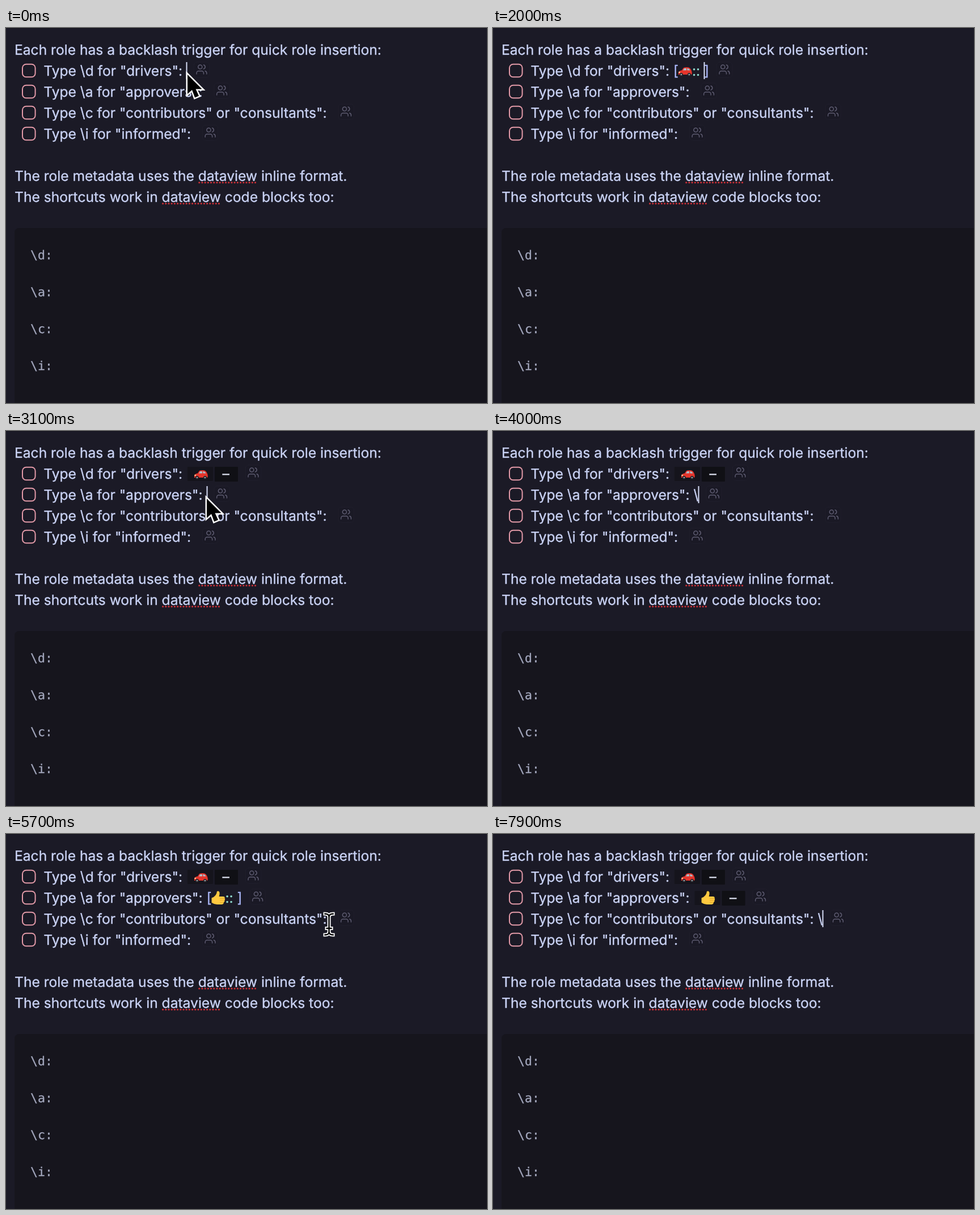
These frames come from a looping animation (848x660 px, 8000 ms). An HTML page with a canvas:

```html
<!DOCTYPE html>
<html lang="en">
<meta charset="utf-8">
<title>Role shortcuts</title>
<style>
  html, body { margin: 0; width: 100%; height: 100%; overflow: hidden; background: #1b1a26 }
  canvas { display: block }
</style>
<canvas id="stage" width="848" height="660"></canvas>
<script>
const c = document.getElementById('stage').getContext('2d');
const SANS = '24.6px Inter, sans-serif';
const MONO = '21.5px "DejaVu Sans Mono", monospace';
const TEXT = '#cad3f5', LAVENDER = '#a9b6f6', TEAL = '#94e2d5';
const LOOP = 8000;

const peoplePaths = [
  'M16 21v-2a4 4 0 0 0-4-4H6a4 4 0 0 0-4 4v2', 'M13 7a4 4 0 1 1-8 0a4 4 0 1 1 8 0',
  'M22 21v-2a4 4 0 0 0-3-3.87M16 3.13a4 4 0 0 1 0 7.75'
].map(d => new Path2D(d));
const arrow = new Path2D('M0 0V34L8 27L13 40.5L20 37.5L14.5 25.5H25.5Z');
const beam = new Path2D('M-7-18.5Q0-18.5 0-13Q0-18.5 7-18.5M0-13V13M-7 18.5Q0 18.5 0 13Q0 18.5 7 18.5M-4 7H4');

const emoji = {
  car: [
    ['#e5352c', 'M1 16V12Q2 9 7 8.5L10 4Q12 3 16 3Q21 3 23 7Q25 10 25 14L24 16Z'],
    ['#a9c3cf', 'M9 8.5L11.5 5H15V8.5ZM16.5 8.5V5Q20 5 21.5 8.5Z'],
    ['#f4d9a0', 'M1.5 11H4V13H1.5Z'],
    ['#26262c', 'M9 16a3 3 0 1 1-6 0a3 3 0 1 1 6 0M23 16a3 3 0 1 1-6 0a3 3 0 1 1 6 0'],
    ['#a4a6ad', 'M7.3 16a1.3 1.3 0 1 1-2.6 0a1.3 1.3 0 1 1 2.6 0M21.3 16a1.3 1.3 0 1 1-2.6 0a1.3 1.3 0 1 1 2.6 0']
  ],
  thumb: [
    ['#ffc940', 'M1 12Q5 11 8 7Q10 4 10 1Q14-1 14.5 4Q14.5 7 13.5 9.5H21Q24 10 23 12.5Q24.5 14 23 16Q23.5 18.5 21.5 19.5Q21.5 22.5 18.5 23H10Q5 23 1 20Z'],
    ['#dd9a26', 'M15 12.4H23V13.2H15ZM15 15.8H23V16.6H15ZM15 19.2H21.5V20H15Z']
  ]
};
for (const parts of Object.values(emoji))
  for (const p of parts) p[1] = new Path2D(p[1]);

const rows = [
  { label: 'Type \\d for "drivers": ', icon: 'car', slash: 1800, insert: 2000, close: 3000 },
  { label: 'Type \\a for "approvers": ', icon: 'thumb', slash: 4000, insert: 4200, close: 5800 },
  { label: 'Type \\c for "contributors" or "consultants": ', slash: 7900 },
  { label: 'Type \\i for "informed": ' }
];

// Caret resets: start time and row; it blinks 500 ms on, 500 ms off.
const carets = [[-300, 0], [700, 0], [1800, 0], [2000, 0], [3000, 1], [4000, 1], [4200, 1], [5800, 2], [7900, 2]];

// Pointer path: time, x, y.
const path = [
  [0, 320, 82], [2300, 320, 82], [2600, 350, 124], [3000, 354, 119], [4600, 354, 119],
  [4900, 599, 140], [5200, 611, 150], [5450, 569.5, 159], [7000, 569.5, 159], [7300, 617, 183], [LOOP, 617, 183]
];
const hidden = [[1700, 2300], [3800, 4600], [7800, LOOP]];

function text(s, x, y, color = TEXT, font = SANS) {
  c.font = font;
  c.textRendering = 'geometricPrecision';   // fractional advances
  c.fillStyle = c.strokeStyle = color;
  c.lineWidth = .35;
  c.fillText(s, x, y);
  c.strokeText(s, x, y);
  return x + c.measureText(s).width;
}

function box(x, y, w, h, r, fill, stroke, line = 1) {
  c.beginPath();
  c.roundRect(x, y, w, h, r);
  if (fill) { c.fillStyle = fill; c.fill(); }
  if (stroke) { c.strokeStyle = stroke; c.lineWidth = line; c.stroke(); }
}

function at(x, y, scale, draw) {
  c.save();
  c.translate(x, y);
  c.scale(scale, scale);
  draw();
  c.restore();
}

function drawEmoji(name, x, y) {
  at(x, y - (name === 'car' ? 17.5 : 20.5), name === 'car' ? 1 : 1.04, () => {
    for (const [color, p] of emoji[name]) { c.fillStyle = color; c.fill(p); }
  });
}

function pointerAt(t) {
  if (hidden.some(([from, to]) => t >= from && t < to)) return null;
  const i = path.findIndex(p => p[0] > t);
  const [t0, x0, y0] = path[i - 1], [t1, x1, y1] = path[i];
  const k = (t - t0) / (t1 - t0), e = k * k * (3 - 2 * k);
  return { x: x0 + (x1 - x0) * e, y: y0 + (y1 - y0) * e, beam: t > 5350 && t < 7100 };
}

function peopleButton(x, y, pointer) {
  const over = pointer && !pointer.beam && Math.abs(pointer.x - x) < 14 && Math.abs(pointer.y - y) < 14;
  box(x - 13.5, y - 13, 27, 27, 5, over ? '#37374d' : '#1a1925', over ? null : '#201f2c');
  at(x - 10.7, y - 10.7, .89, () => {
    c.strokeStyle = over ? '#62617a' : '#5d5b70';
    c.lineWidth = 1.7;
    for (const p of peoplePaths) c.stroke(p);
  });
}

function drawRow(row, i, t, pointer) {
  const mid = 75 + 37 * i, base = mid + 8.5;
  box(29, mid - 11.3, 22.6, 22.6, 6.5, null, '#e39aa8', 2);
  let x = text(row.label, 66.3, base), caret = x;
  if (t >= row.close) {
    box(x + 2, mid - 12, 45, 25, 1, '#15141c');
    drawEmoji(row.icon, x + 13, base);
    box(x + 50, mid - 12, 41, 26, 1, '#101015');
    text('–', x + 63.5, base, '#dfe3f2');
    x += 91;
  } else if (t >= row.insert) {
    const inner = text('[', x, base, LAVENDER);
    drawEmoji(row.icon, inner - 1, base);
    caret = text(':: ', inner + 24, base, TEAL);
    x = text(']', caret, base, LAVENDER);
  } else if (t >= row.slash) {
    caret = x = text('\\', x, base);
  }
  const [since, target] = carets.findLast(k => k[0] <= t);
  if (target === i && (t - since) % 1000 < 500) {
    c.fillStyle = '#d6dcf5';
    c.fillRect(Math.round(caret) - .5, mid - 15, 2, 30);
  }
  peopleButton(x + 27, mid - 2, pointer);
}

function misspelt(before, word, after, y) {
  const from = text(before, 15, y), to = text(word, from, y);
  text(after, to, y);
  c.fillStyle = '#cf3038';
  for (let x = from + 2; x < to; x += 5.2) {
    c.beginPath();
    c.arc(x, y + 3.5, 1.6, 0, 7);
    c.fill();
  }
}

function drawPointer(p) {
  at(p.x, p.y, 1, () => {
    c.lineJoin = 'miter';
    c.strokeStyle = '#fff';
    if (p.beam) {
      c.lineCap = 'square';
      c.lineWidth = 6;
      c.stroke(beam);
      c.strokeStyle = '#000';
      c.lineWidth = 2.4;
      c.stroke(beam);
    } else {
      c.lineWidth = 5;
      c.stroke(arrow);
      c.fillStyle = '#000';
      c.fill(arrow);
    }
  });
}

function draw(now) {
  const t = now % LOOP, pointer = pointerAt(t);
  c.fillStyle = '#1b1a26';
  c.fillRect(0, 0, 848, 660);
  c.fillStyle = '#14131c';
  c.fillRect(0, 0, 848, 1);
  c.lineCap = c.lineJoin = 'round';

  text('Each role has a backlash trigger for quick role insertion:', 15, 46.5);
  rows.forEach((row, i) => drawRow(row, i, t, pointer));
  misspelt('The role metadata uses the ', 'dataview', ' inline format.', 268.5);
  misspelt('The shortcuts work in ', 'dataview', ' code blocks too:', 305.5);

  box(15, 352, 860, 340, 8, '#16151d');
  ['\\d:', '\\a:', '\\c:', '\\i:'].forEach((s, i) => text(s, 43, 407 + 65 * i, '#a3a7bd', MONO));
  if (pointer) drawPointer(pointer);
  requestAnimationFrame(draw);
}
requestAnimationFrame(draw);
</script>
</html>
```
